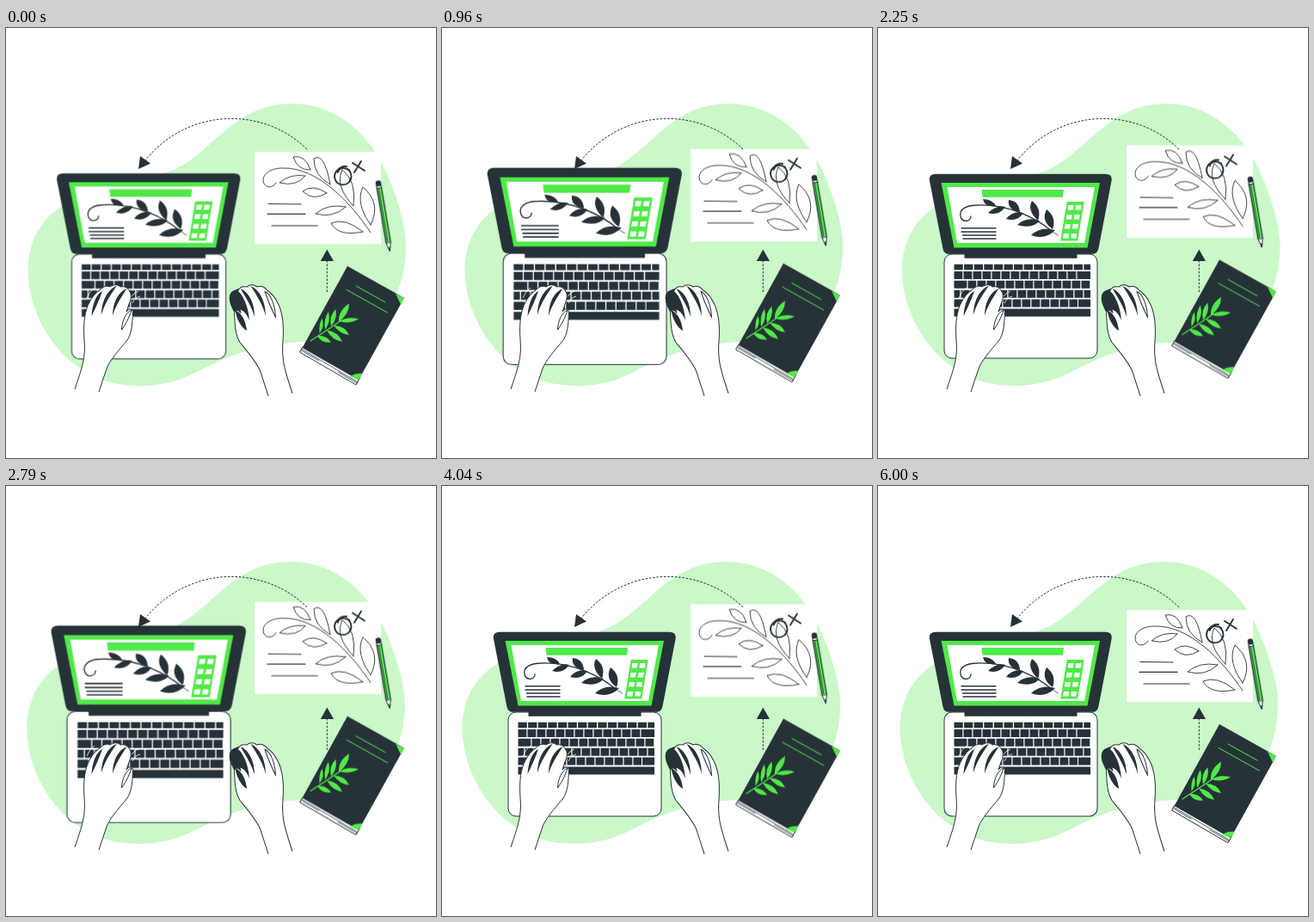
These frames come from a looping animation (500x500 px, 6040 ms). An HTML page without scripts:

```html
<!DOCTYPE html>
<html lang="en">
<head>
<meta charset="utf-8">
<title>Design desk</title>
<style>
:root { --dark: #263238; --green: #50e948; }
html, body { margin: 0; width: 100%; height: 100%; overflow: hidden; background: #fff; }
svg { display: block; width: 100vw; height: 100vh; }
.dark { fill: var(--dark); }
.green { fill: var(--green); }
.white { fill: #fff; }
.line { fill: none; stroke: var(--dark); stroke-linecap: round; stroke-linejoin: round; }
.edge { fill: #fff; stroke: var(--dark); stroke-linejoin: round; }
.gline { fill: none; stroke: var(--green); stroke-linecap: round; }
.keys { fill: none; stroke: var(--dark); stroke-width: 8.9; stroke-dasharray: 9.8 1.2; }
.keys .top { stroke-width: 6.6; stroke-dasharray: 10.3 1.3; }
.keys .wide { stroke-dasharray: none; }
.dash { fill: none; stroke: var(--dark); stroke-dasharray: 2.6 1.7; }

.sway, .beat, .float { animation: 6040ms linear -40ms infinite; }
.sway { animation-name: sway; }
.beat { animation-name: beat; transform-origin: 165.8px 276.8px; }
.float { animation-name: float; }
.fast { animation-duration: 3020ms; }

@keyframes sway {
  0%, 100% { transform: translateX(0); }
  10%, 90% { transform: translateX(-1px); }
  20%, 80% { transform: translateX(2px); }
  30%, 50%, 70% { transform: translateX(-4px); }
  40%, 60% { transform: translateX(4px); }
}
@keyframes beat {
  0%, 30%, 40%, 60%, 100% { transform: scale(1); }
  10%, 50% { transform: scale(1.1); }
}
@keyframes float {
  0%, 100% { transform: translateY(0); }
  50% { transform: translateY(-10px); }
}
</style>
</head>
<body>
<svg viewBox="0 0 500 500">
  <defs>
    <g id="hand">
      <path class="edge" d="M80 420C88 396 93 384 91 362C89.500 342 92 328 97 319C100 313 104 308 109 305C112 301 117 299 121 301C125 298 130 298 133 301C138 300 142 302 143.500 306C146 309 146 314 143 321L140 330C143 326 147 326 147.500 330C147 345 146 355 141 363C130 376 121 386 117 396L108 423"/>
      <g class="dark">
        <path d="M128.500 300C118 304 111 318 111 333.500C114 322 121 311 128.500 300Z"/>
        <path d="M140.500 303C130 307 124 320 124 334.500C127 324 134 313 140.500 303Z"/>
      </g>
    </g>
    <path id="pinky" d="M112 306C105 309 100 322 99.500 335C104 326 109 315 112 306Z"/>
    <g id="squares">
      <rect width="6.4" height="5.6"/>
      <rect x="9" width="6.4" height="5.6"/>
    </g>
  </defs>

  <path class="sway" fill="#caf8c8" d="M333 88C385 88 425 125 444 172C458 205 467 238 465 262C461 325 425 362 355 364C285 368 255 383 222 400C190 416 165 417 145 415.500C75 412 25.500 345 25.500 280C26.500 240 48 212 82 199C120 183 160 180 190 167C240 148 262 88 333 88Z"/>

  <!-- paper -->
  <g class="float">
    <path class="white" d="M289 144H436V251.500H289Z"/>
    <path class="line" d="M314 180C311 186 302 187 299.500 180C297 171 306 163 322 163C362 162 400 202 424 238
      M354 165Q339 166 334 150Q348 147 354 165
      M348 172Q331 169 318 180Q338 185 348 172
      M377 182Q358 172 358 152Q370 144 377 182
      M373 192Q357 181 345 190Q357 202 373 192
      M404 207Q382 184 391 165Q408 178 404 207
      M395 208Q374 204 360 216Q380 222 395 208
      M424 229Q406 204 415 185Q437 204 424 229
      M415 237Q394 220 378 227Q386 243 415 237" stroke-width=".9"/>
    <path class="line" stroke-width="1.200" d="M305 204.500L343 205M304 216.300H348M309 230H362"/>
    <path class="line" stroke-width="1.900" d="M399 165C391 160 382 165 382 173C383 186 401 185 401.500 173C401 162 389 160 385.500 168M386 165Q390 160 396 161M403 157L417 166M413 155L405 168"/>
  </g>

  <!-- pencil -->
  <g class="float fast">
    <g transform="translate(432.500 178) rotate(-9.600)">
      <path class="edge" d="M-2.700 6H2.700V73L0 83L-2.700 73Z"/>
      <path class="green" d="M-2.200 9H2.200V72H-2.200Z"/>
      <path class="line" d="M-2.700 8.500H2.700M-2.700 73H2.700M-.800 9V72M-2.700 8V73M2.700 8V73"/>
      <path class="dark" d="M-3.200 6V2Q-3 -.5 0 -.5Q3 -.5 3.200 2V6ZM-1.500 78.500H1.500L0 83.500Z"/>
    </g>
  </g>

  <!-- book -->
  <g class="float">
    <path class="edge" d="M345 371L341.500 377L407 415L412 406Z"/>
    <path class="dark" d="M397 277L463 314L410 409.500L344.500 372Z"/>
    <path class="line" stroke-width=".8" d="M343.500 375L364 387M344 373.500L408.500 411.500M386 400L408 413"/>
    <path class="green" d="M453 309L463 314L459 321.500ZM400 405Q408 401 414.500 402L410 409.500Z"/>
    <path class="gline" d="M407 300L441 319M396 304.500L443.500 331"/>
    <path class="gline" stroke-width="1.200" d="M354 364Q374 351 390 340"/>
    <path class="green" d="M387 342Q386 329 399 320.500Q399 333 387 342Z
      M388 341Q397 335 410 338.500Q399 345 388 341Z
      M378 347Q375 335 383.500 327Q385.500 339 378 347Z
      M371 351Q369 338 375 330Q378 342 371 351Z
      M364.500 355Q363.500 345 367.500 338Q371 347 364.500 355Z
      M381 346Q394 346 399 357Q388 356 381 346Z
      M373 351.500Q386 353 391 365Q379 363 373 351.500Z
      M362 358Q373 357 378 365.500Q367 367 362 358Z"/>
  </g>

  <!-- laptop -->
  <g class="beat">
    <rect class="edge" x="77" y="263" width="178" height="121" rx="9"/>
    <path class="dark" d="M67 169.800H264.500Q273 170 271.500 178L256.500 256Q255 262.800 250 262.800H82Q77 262.800 75.500 257L60 178Q58.500 170 67 169.800ZM100.500 261H231.500V267.800H100.500Z"/>
    <path class="green" d="M73.500 180H258L243.500 255.500H88.500Z"/>
    <path class="white" d="M80.500 185H252L240 250H92Z"/>
    <path class="green" d="M120.500 188H216L215 196.800H121.500Z"/>
    <g transform="translate(219.700 202) skewX(-9.400)">
      <path class="green" d="M0 0H20V45.500H0Z"/>
      <g class="white">
        <use href="#squares" x="2.300" y="4"/>
        <use href="#squares" x="2.300" y="15"/>
        <use href="#squares" x="2.300" y="26"/>
        <use href="#squares" x="2.300" y="37"/>
      </g>
    </g>
    <path class="line" stroke-width="1.500" d="M97 232.700H137M97 237H137M98.500 241H137M99 245H137"/>
    <path class="line" stroke-width="1.300" d="M108 219C108 225 98 227 96 219C94 210 104 206 116 206C154 205 185 222 202 236"/>
    <path class="line" stroke-width=".7" d="M200 235L209.500 241"/>
    <path class="dark" d="M137 207Q124 209 122 199Q133 199 137 207Z
      M148 208Q139 205 128 215Q140 219 148 208Z
      M165 214Q150 211 152 200Q164 201 165 214Z
      M169 215Q157 212 149 222Q162 226 169 215Z
      M186 224Q173 212 179 201Q191 210 186 224Z
      M188 224Q172 219 162 229Q180 234 188 224Z
      M203 234Q189 224 196 211Q208 220 203 234Z
      M206 235Q189 230 178 241Q194 247 206 235Z"/>
    <g class="keys">
      <path class="top" d="M88.500 278H247"/>
      <path d="M88.500 287.500H232M104.500 298.300H247M96.500 309.200H247M101.500 320H232"/>
      <path class="wide" d="M232 287.500H247M88.500 298.300H103.300M88.500 309.200H95.300M88.500 320H100.300M233 320H247M88.500 331H247"/>
    </g>
  </g>

  <!-- hands -->
  <path fill="none" stroke="#fff" stroke-width=".8" d="M94 314Q97 306 103 302M147 320Q150 313 156 312M146 312Q150 307 154 306"/>
  <use href="#hand"/>
  <use href="#pinky" class="dark"/>
  <path class="line" d="M146 328C139 331 135 340 134.500 351C138 346 143 338 146 328"/>
  <path class="dark" d="M260 312C262 305 270 302 278 303L284 340L279 362C271 352 268 340 265 330C262 324 259 318 260 312Z"/>
  <g transform="matrix(-1 0 0 1.040 413 -12)">
    <use href="#hand"/>
    <use href="#pinky" class="edge"/>
  </g>
  <path class="dark" d="M260 311C262 304 268 303 272 308C278 315 282 327 283 340C279 330 274 326 267 328C262 324 259 318 260 311ZM266.500 328C274 331 279 341 280 352C273 348 268 338 266.500 328Z"/>

  <!-- arrows -->
  <path class="dash" d="M350 141C298 90 210 93 161 155M373.300 307V270"/>
  <path class="dark" d="M156 149L168 157.500L154 164ZM373.300 257.500L381 271H365.800Z"/>
</svg>
</body>
</html>
```
